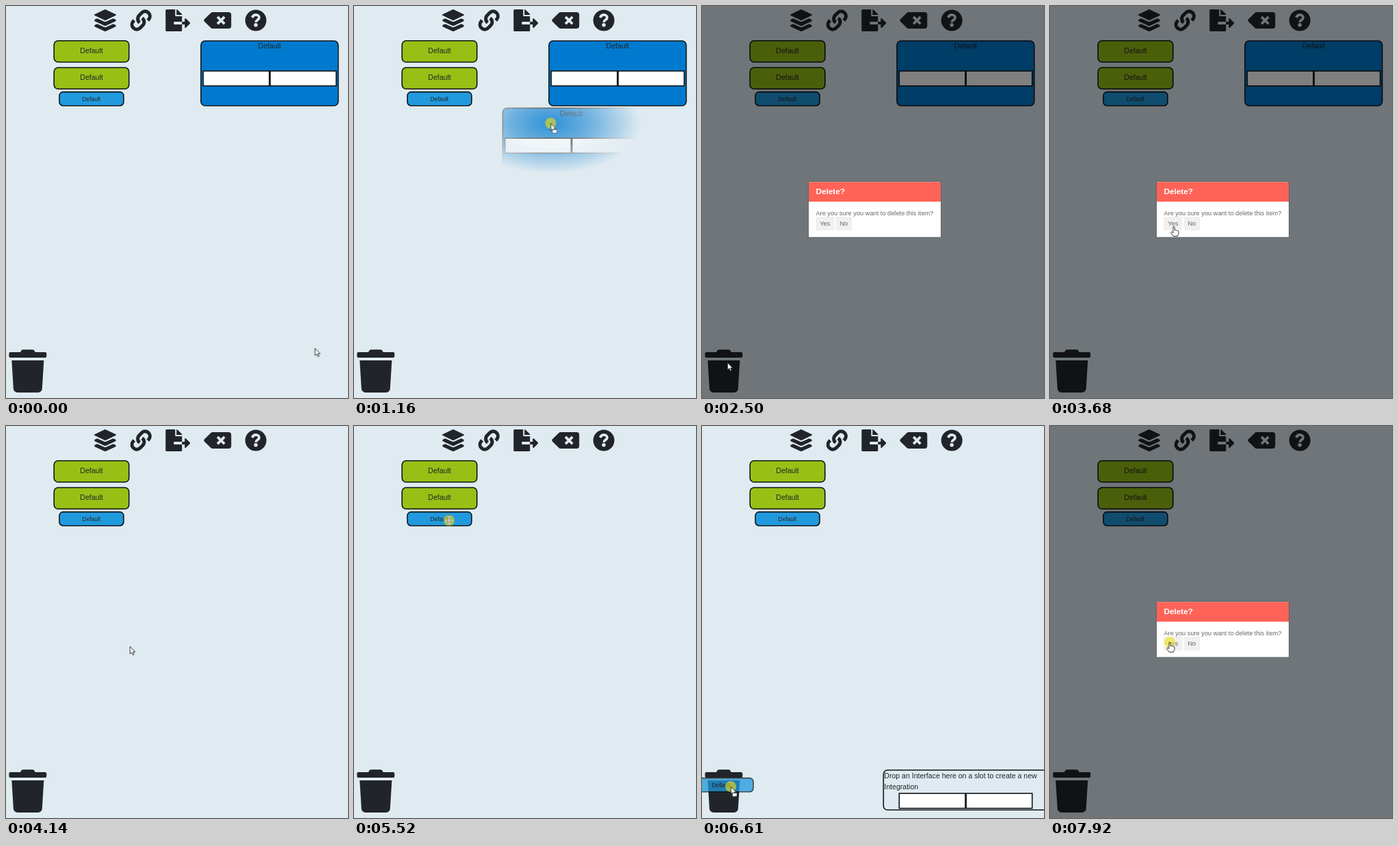
An HTML page that plays this animation: 500x573 px, repeating every 8000 ms.

```html
<!DOCTYPE html>
<html lang="en">
<head>
<meta charset="utf-8">
<title>Drag to delete</title>
<style>
  html, body { margin: 0; width: 100%; height: 100%; overflow: hidden; background: #e0ebf1; }
  svg { display: block; width: 100%; height: 100%; }
  text { font: 10.56px Arial, "Liberation Sans", sans-serif; fill: #212529; }
  .mid { text-anchor: middle; }
  .small { font-size: 8.45px; }
  .dialog text { font-size: 9.24px; fill: #666; }
  .dialog .title { font-size: 11.8px; font-weight: bold; fill: #fff; }
  .box { stroke: #101418; stroke-width: 1.6; }
  .ink { fill: #212529; }
  .line { fill: none; stroke: #212529; }
  .cut { fill: none; stroke: #e0ebf1; }
  .cursor { fill: #fff; stroke: #222; stroke-width: .9; stroke-linejoin: round; }

  /* Shared 8 s clock: switches jump, the pointer glides */
  .switch { animation: 8s step-end infinite; }
  #pointer { animation: travel 8s ease-in-out infinite; }
  #card { animation-name: card; }
  #dim { animation-name: dim; }
  #dialog { animation-name: dialog; }
  #dropzone, #ghostItem { animation-name: dragItem; }
  #ghostCard { animation-name: dragCard; }
  #press { animation-name: press; }
  #arrow { animation-name: arrow; }
  #dragBadge { animation-name: badge; }
  #cross { animation-name: cross; }
  #hand { animation-name: hand; }

  @keyframes travel {
    0%, .6% { transform: translate(451.5px, 500px); }
    7% { transform: translate(326px, 112px); }
    9.8%, 11.2% { transform: translate(355px, 73px); }
    21.3%, 22% { transform: translate(54px, 511px); }
    25.5%, 33.5% { transform: translate(37px, 521px); }
    36.4%, 37.6% { transform: translate(140px, 378px); }
    43%, 44.5% { transform: translate(178px, 313px); }
    46%, 54% { transform: translate(181px, 322px); }
    64.25%, 70% { transform: translate(139px, 138px); }
    78.6% { transform: translate(75px, 495px); }
    82.5%, 91% { transform: translate(42px, 527px); }
    98.1%, 100% { transform: translate(175px, 316px); }
  }
  @keyframes card { 0% { opacity: 1; } 51.75%, 100% { opacity: 0; } }
  @keyframes dim {
    0%, 51.75% { opacity: 0; }
    30.375%, 89.5% { opacity: .5; }
    31.25%, 90.375%, 100% { opacity: 1; }
  }
  @keyframes dialog {
    0%, 48.625% { opacity: 0; }
    30.375%, 89.5% { opacity: .5; }
    31.25%, 90.375%, 100% { opacity: 1; }
  }
  @keyframes dragCard { 0%, 26.5%, 100% { opacity: 0; } 11.625% { opacity: 1; } }
  @keyframes dragItem { 0%, 88.5%, 100% { opacity: 0; } 70.25% { opacity: 1; } }
  @keyframes press {
    0%, 26.5%, 48.625%, 88.5% { opacity: 0; }
    9.875%, 47.75%, 65.125%, 99%, 100% { opacity: 1; }
  }
  @keyframes badge {
    0%, 26.5%, 88.5%, 100% { opacity: 0; }
    11.625%, 70.25% { opacity: 1; }
  }
  @keyframes cross {
    0%, 11.625%, 70.25%, 100% { opacity: 0; }
    7%, 63.5% { opacity: 1; }
  }
  @keyframes hand {
    0%, 48.625% { opacity: 0; }
    42%, 97.5%, 100% { opacity: 1; }
  }
  @keyframes arrow {
    0%, 11.625%, 48.625%, 70.25% { opacity: 1; }
    7%, 42%, 63.5%, 97.5%, 100% { opacity: 0; }
  }
</style>
</head>
<body>
<svg viewBox="0 0 500 573" preserveAspectRatio="none">
  <defs>
    <radialGradient id="fade" gradientUnits="userSpaceOnUse" cx="0" cy="0" r="132" gradientTransform="scale(1 .56)">
      <stop offset="0" stop-color="#fff" stop-opacity=".8"/>
      <stop offset=".45" stop-color="#fff" stop-opacity=".5"/>
      <stop offset="1" stop-color="#fff" stop-opacity="0"/>
    </radialGradient>
    <mask id="spot" maskUnits="userSpaceOnUse" x="-140" y="-90" width="280" height="180">
      <rect x="-140" y="-90" width="280" height="180" fill="url(#fade)"/>
    </mask>
    <g id="slots" class="box" fill="#fff">
      <rect x="288.3" y="95" width="96.7" height="21.8"/>
      <rect x="386.2" y="95" width="96.5" height="21.8"/>
    </g>
    <g id="integration">
      <rect class="box" x="285" y="51" width="200.7" height="94.8" rx="6" fill="#007acf"/>
      <text class="mid" x="385.3" y="62.3">Default</text>
      <use href="#slots"/>
    </g>
    <g id="item">
      <rect class="box" x="78" y="125.6" width="94" height="20.2" rx="5.5" fill="#2199dd"/>
      <text class="mid small" x="124.8" y="138.7">Default</text>
    </g>
    <g id="system">
      <rect class="box" x="70.2" y="50.8" width="109.6" height="31.2" rx="6" fill="#98bf15"/>
      <text class="mid" x="125" y="69">Default</text>
    </g>
    <path id="layer" d="M70 210 12 236q-18 20 0 40L245 382q11 4 22 0L500 276q18-20 0-40L442 210 280 283q-24 10-48 0Z"/>
    <path id="chain" d="M97 257 73 281A112 112 0 0 0 231 439L298 372A112 112 0 0 0 285 203" stroke-width="80"/>
  </defs>

  <rect width="500" height="573" fill="#e0ebf1"/>

  <g class="ink" transform="translate(129 5) scale(.0625)">
    <path d="M256 12 500 128 256 244 12 128Z" stroke="#212529" stroke-width="24" stroke-linejoin="round"/>
    <use href="#layer"/>
    <use href="#layer" y="128"/>
  </g>
  <g class="line" transform="translate(181.3 5) scale(.0625)">
    <use href="#chain"/>
    <use href="#chain" transform="rotate(180 256 256)"/>
  </g>
  <g class="ink" transform="translate(233.3 5) scale(.0625)">
    <path d="M24 0H224V136q0 24 24 24H384V288H208q-16 0-16 16v32q0 16 16 16H384V488q0 24-24 24H24q-24 0-24-24V24Q0 0 24 0Z"/>
    <path d="M256 0q16 0 23 7L377 105q7 7 7 23H256Z"/>
    <path d="M384 288h64V223q6-24 27-11L571 308q8 12 0 24L475 428q-21 13-27-11V352H384Z"/>
  </g>
  <g class="ink" transform="translate(289.3 5) scale(.0625)">
    <path d="M576 64H205q-27 0-45 19L9 233q-18 23 0 46L160 429q18 19 45 19H576a64 64 0 0 0 64-64V128a64 64 0 0 0-64-64Z"/>
    <path class="cut" d="M318 174 482 338M482 174 318 338" stroke-width="58"/>
  </g>
  <g class="ink" transform="translate(349.2 5) scale(.0625)">
    <circle cx="256" cy="256" r="248"/>
    <path class="cut" d="M170 190Q200 126 256 126C306 126 334 156 334 190 334 244 258 242 258 300" stroke-width="60"/>
    <circle cx="256" cy="364" r="44" fill="#e0ebf1"/>
  </g>
  <g class="ink" transform="translate(4.4 502.2) scale(.1225)">
    <path d="M16 32H136L145 13Q152 0 167 0H281q15 0 22 13L312 32H432q16 0 16 16V80q0 16-16 16H16Q0 96 0 80V48Q0 32 16 32ZM32 128H416L395 467a48 48 0 0 1-48 45H101a48 48 0 0 1-48-45Z"/>
  </g>

  <use href="#system"/>
  <use href="#system" y="39.2"/>
  <use href="#item"/>
  <use id="card" class="switch" href="#integration"/>

  <g id="dropzone" class="switch">
    <rect class="box" x="265.3" y="503" width="260" height="58.2" rx="6" fill="none"/>
    <text x="266.3" y="514.7">Drop an Interface here on a slot to create a new</text>
    <text x="266.3" y="530.5">Integration</text>
    <use href="#slots" y="442"/>
  </g>

  <rect id="dim" class="switch" width="500" height="573" fill="#000" fill-opacity=".5"/>
  <g id="dialog" class="switch dialog">
    <rect x="155" y="256.5" width="195" height="82" fill="#000" opacity=".12"/>
    <rect x="156" y="257.3" width="193" height="80.4" fill="#fff"/>
    <rect x="156" y="257.3" width="193" height="28.7" fill="#ff6358"/>
    <text class="title" x="166.4" y="275.3">Delete?</text>
    <text x="166.4" y="306">Are you sure you want to delete this item?</text>
    <path d="M166.2 308h27.4v20h-27.4ZM195.8 308h23.4v20h-23.4Z" fill="#f0f0f0"/>
    <text class="mid" x="179.8" y="321">Yes</text>
    <text class="mid" x="207.3" y="321">No</text>
  </g>

  <g id="pointer">
    <g id="ghostCard" class="switch"><g mask="url(#spot)">
      <use href="#integration" x="-355" y="-73"/>
    </g></g>
    <g id="ghostItem" class="switch">
      <use href="#item" x="-139" y="-138" opacity=".76"/>
    </g>
    <circle id="press" class="switch" r="8" fill="#f0e114" fill-opacity=".62"/>
    <g id="arrow" class="switch">
      <path class="cursor" d="M.3.3V11L2.7 8.8 4.5 12.7 6.2 12 4.5 8.2H7.8Z"/>
    </g>
    <g id="dragBadge" class="switch">
      <rect x="2.5" y="9.5" width="6.5" height="5" fill="#fff" stroke="#222" stroke-dasharray="1 1"/>
    </g>
    <g id="cross" class="switch" fill="none">
      <path id="crossLines" d="M-6 0H6M0-6V6M-4-2-6 0-4 2M4-2 6 0 4 2M-2-4 0-6 2-4M-2 4 0 6 2 4" stroke="#333" stroke-width="2" stroke-opacity=".6"/>
      <path d="M-6 0H6M0-6V6M-4-2-6 0-4 2M4-2 6 0 4 2M-2-4 0-6 2-4M-2 4 0 6 2 4" stroke="#fff"/>
    </g>
    <g id="hand" class="switch">
      <path class="cursor" d="M-1 1Q0-.6 1.2 1V5.5Q2.5 4.6 3.4 6 4.8 5.3 5.4 6.7 7 6.4 7 8V10.5L5.5 14.5H-.8L-4.2 9.6Q-4.2 7.6-2.4 8.3L-1 9.7Z"/>
    </g>
  </g>
</svg>
</body>
</html>
```
